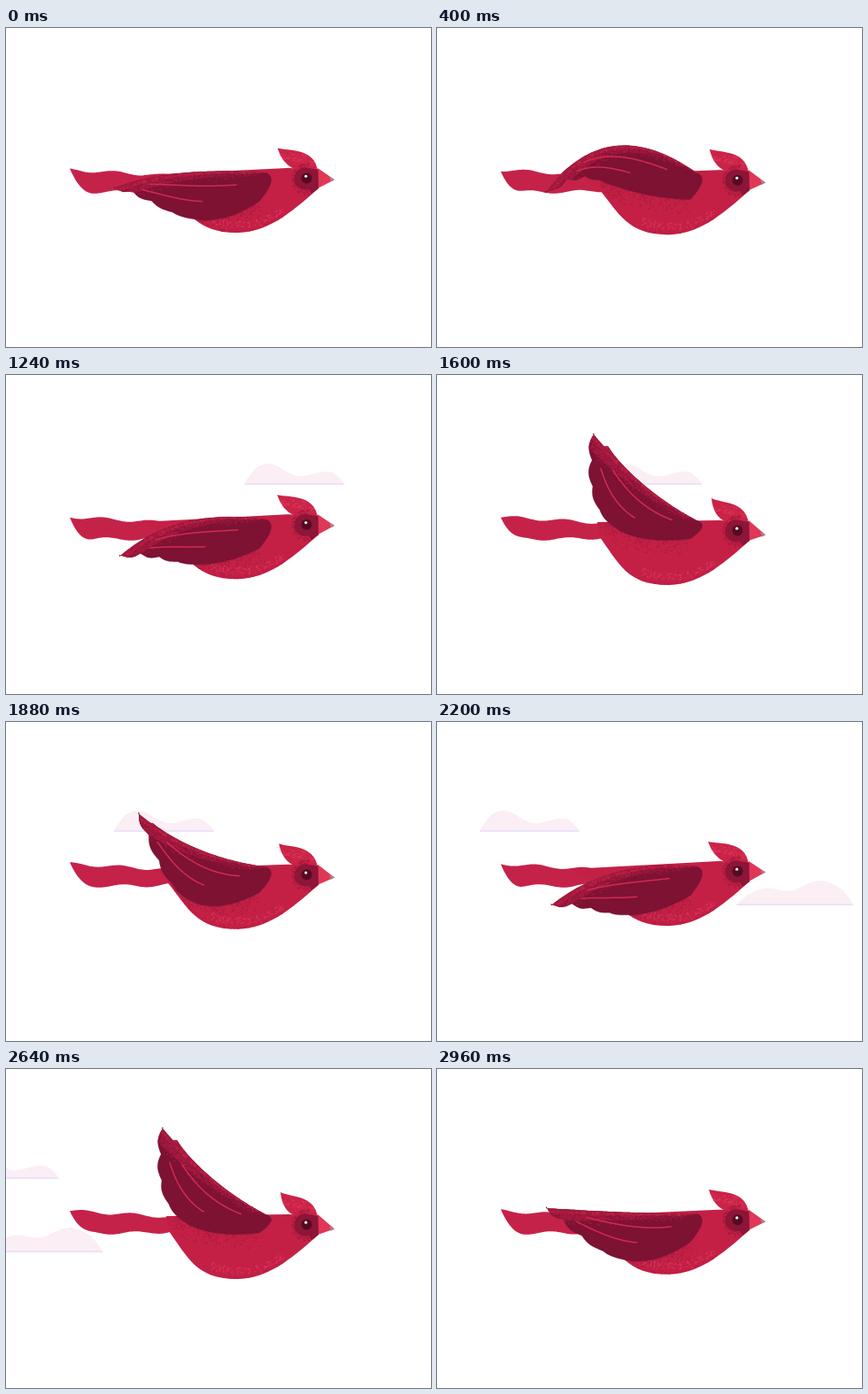
Write an HTML page with a canvas that moves like this. It is 480 px wide and 360 px high and loops after 3000 ms.

```html
<!DOCTYPE html>
<html lang="en">
<head>
<meta charset="utf-8">
<title>Flying bird</title>
<style>
html, body { margin: 0; width: 100%; height: 100%; overflow: hidden; background: #fff; }
canvas { display: block; width: 480px; height: 360px; }
</style>
</head>
<body>
<canvas id="stage"></canvas>
<script>
const canvas = document.getElementById('stage');
const ctx = canvas.getContext('2d');
const dpr = window.devicePixelRatio || 1;
canvas.width = 480 * dpr;
canvas.height = 360 * dpr;

const LOOP = 3000, FLAP = 1000, STEP = 40, DIP = 7;
const RED = '#c42045', DARK = '#7d1233', PINK = '#d22a4f';

// Each wing pose: tip, pull on the leading edge, two pulls on the trailing edge
const rest = [[122, 181], [183, 156], [163, 178], [202, 252]];
const down = [[129, 207], [193, 155], [180, 198], [202, 243]];
const fold = [[123, 186], [192, 92], [182, 144], [175, 189]];
const up = [[176, 66], [230, 131], [170, 125], [165, 198]];
const mid = [[149, 103], [209, 152], [172, 145], [184, 246]];
const flat = [[123, 157], [208, 163], [160, 177], [202, 254]];

// at: time in the flap, dip: how far the body has sunk, ease: power to the next key
const keys = [
  { at: 0, wing: rest, dip: .15, ease: .7 },
  { at: 200, wing: down, dip: 0, ease: 1.4 },
  { at: 400, wing: fold, dip: .45, ease: 1 },
  { at: 600, wing: up, dip: 1, ease: 1 },
  { at: 700, wing: up, dip: 1, ease: 1.9 },
  { at: 880, wing: mid, dip: .55, ease: 1 },
  { at: 960, wing: flat, dip: .25, ease: 1 },
  { at: FLAP, wing: rest, dip: .15 }
];

// Humps are [centre, height, spread]
const clouds = [
  { width: 113, bottom: 124, base: 4, humps: [[27, 20, 26], [92, 11, 25]],
    x: t => 352 - (t - 880) * .2303 },
  { width: 132, bottom: 207, base: 6, humps: [[34, 13, 24], [95, 22, 32]],
    x: t => 338 - (t - 2200) * .8205 }
];

const mix = (a, b, k) => a + (b - a) * k;
const mixPt = (p, q, k) => [mix(p[0], q[0], k), mix(p[1], q[1], k)];
const clamp = v => Math.max(0, Math.min(1, v));

function bezier(pts, t) {
  while (pts.length > 1) pts = pts.slice(1).map((p, i) => mixPt(pts[i], p, t));
  return pts[0];
}

function sample(fn, from = 0, to = 1, n = 60) {
  return Array.from({ length: n + 1 }, (_, i) => fn(mix(from, to, i / n)));
}

function random(seed) {
  return () => (seed = (seed * 16807) % 2147483647) / 2147483647;
}

// Point at share t of a curve, moved to its right-hand side by off
function beside(fn, t, off) {
  const [x, y] = fn(t), a = fn(t - .01), b = fn(t + .01);
  const dx = b[0] - a[0], dy = b[1] - a[1], len = Math.hypot(dx, dy) || 1;
  return [x - dy / len * off, y + dx / len * off];
}

function polygon(pts) {
  const path = new Path2D();
  pts.forEach(p => path.lineTo(...p));
  path.closePath();
  return path;
}

function fill(path, color) {
  ctx.fillStyle = color;
  ctx.fill(path);
}

function edge(path) {
  ctx.strokeStyle = 'rgba(90,20,50,.4)';
  ctx.lineWidth = .5;
  ctx.stroke(path);
}

function disc(x, y, r, color) {
  const path = new Path2D();
  path.arc(x, y, r, 0, Math.PI * 2);
  fill(path, color);
}

function clipped(path, draw) {
  ctx.save();
  ctx.clip(path);
  draw();
  ctx.restore();
}

function speckle(fn, count, color, seed, offset) {
  const rnd = random(seed);
  ctx.fillStyle = color;
  for (let i = 0; i < count; i++) {
    const t = rnd(), [x, y] = beside(fn, t, offset(rnd(), t));
    const r = .7 + rnd() * .7;
    ctx.fillRect(x, y, r * 1.3, r);
  }
}

function pose(tau) {
  const i = keys.findIndex((k, n) => tau < keys[n + 1].at);
  const a = keys[i], b = keys[i + 1];
  const k = Math.pow((tau - a.at) / (b.at - a.at), a.ease);
  return { pull: a.wing.map((p, n) => mixPt(p, b.wing[n], k)), dip: mix(a.dip, b.dip, k) };
}

function makeWing({ pull, dip }) {
  const [tip, front, back1, back2] = pull;
  const shoulder = [293, 163 + dip], root = [286, 196 - 11 * dip * dip];
  const lead = t => bezier([tip, front, shoulder], t);
  const trail = t => bezier([tip, back1, back2, root], t);
  // Feather ends swell along the trailing edge, one more opens near the tip
  const swell = t => (4.5 * Math.abs(Math.sin(6 * Math.PI * t)) - 1.5) * clamp(1.3 - 2 * t);
  const split = t => t < .12 ? 0 : -4 * dip * dip * Math.exp((.12 - t) * 9);
  const leadEdge = t => beside(lead, t, split(t));
  const shape = polygon([
    ...sample(leadEdge),
    ...sample(t => bezier([shoulder, [309, shoulder[1] + 5], root], t)),
    ...sample(t => beside(trail, t, swell(t)), 1, 0)
  ]);
  return { lead, leadEdge, trail, shape };
}

function drawCloud({ width, bottom, base, humps, x }, t, alpha) {
  const height = s => Math.sqrt(clamp(Math.min(s, width - s) / 12)) *
    humps.reduce((sum, [c, h, w]) => sum + h * Math.exp(-(((s - c) / w) ** 2)), base);
  const path = polygon(sample(s => [s, bottom - height(s)], 0, width));
  ctx.save();
  ctx.globalAlpha = alpha;
  ctx.translate(x(t), 0);
  fill(path, '#fceef5');
  clipped(path, () => {
    ctx.fillStyle = '#ebe2fa';
    ctx.fillRect(0, bottom - 1.8, width, 2);
  });
  ctx.restore();
}

function drawTail(tau) {
  const wave = x => 1.8 * Math.cos(2 * Math.PI * ((x - 95) / 55 + tau / FLAP));
  const top = x => 160 + (x - 72) * .06 + wave(x);
  const low = x => {
    const open = 1 - Math.pow(Math.max(0, 100 - x) / 28, 2.5);
    return mix(top(x), 185 + wave(x - 4) - Math.max(0, x - 150) * .04, open);
  };
  const path = polygon([
    ...sample(x => [x, top(x)], 72, 186),
    ...sample(x => [x, low(x)], 186, 72)
  ]);
  fill(path, '#c5224a');
}

function drawBody(dip, wing) {
  const y = DIP * dip;
  const path = new Path2D();
  path.moveTo(184, 183);
  path.lineTo(mix(150, 181, dip), 166);
  path.lineTo(318, 157 + y);
  path.lineTo(353, 158 + y);
  path.lineTo(353, 180 + y);
  path.bezierCurveTo(320, 209 + y, 295, 230 + y, 260, 230 + y);
  path.bezierCurveTo(215, 230 + y, 205, 205 + y, 184, 183);
  fill(path, RED);
  clipped(path, () => {
    speckle(t => wing.trail(.5 + t / 2), 300, '#ab1b40', 31, r => r * r * 16);
    const belly = t => bezier([[232, 212 + y], [272, 230 + y], [312, 202 + y]], t);
    speckle(belly, 130, '#d9335f', 47, r => (r - .3) * 9);
    speckle(belly, 60, '#b51a40', 59, r => 4 + r * 8);
  });
}

function drawHead(dip) {
  ctx.save();
  ctx.translate(0, DIP * dip);

  const tip = [371, 169.5 + 4 * dip];
  fill(polygon([[352, 157], tip, [352, 180]]), '#e03757');
  fill(polygon([tip, [tip[0] - 6, tip[1] - 3.8], [tip[0] - 4, tip[1] + 2.2]]), '#a8808f');

  const crest = new Path2D();
  crest.moveTo(mix(306, 310, dip), mix(135, 132, dip));
  crest.bezierCurveTo(320, 138, 348, 134, 352, 160);
  crest.lineTo(325, 158);
  crest.quadraticCurveTo(312, 152, mix(306, 310, dip), mix(135, 132, dip));
  fill(crest, '#cb2348');
  clipped(crest, () => speckle(t => [mix(310, 350, t), 138 + 9 * t * t], 60, '#dc3c5d', 71, r => r * 9));

  speckle(t => [339 + 12 * Math.cos(Math.PI * (.45 + t * 1.1)), 169 + 12 * Math.sin(Math.PI * (.45 + t * 1.1))],
    110, '#a3193d', 83, r => -r * 6);
  const mask = new Path2D();
  mask.arc(338, 169, 12.5, Math.PI * .4, Math.PI * 1.6);
  mask.lineTo(352.5, 159);
  mask.lineTo(353, 180);
  mask.lineTo(345, 186);
  mask.closePath();
  fill(mask, '#8c1538');
  disc(339.5, 168.5, 6, '#560a22');
  disc(338.7, 166.2, 1.6, '#fff');
  ctx.restore();
}

function drawWing({ lead, leadEdge, trail, shape }) {
  const band = t => 14 * Math.pow(clamp(1 - t), .6);
  fill(shape, DARK);
  clipped(shape, () => {
    const strip = polygon([
      ...sample(t => beside(leadEdge, t, -4)),
      ...sample(t => beside(lead, t, band(t)), 1, 0)
    ]);
    fill(strip, '#a4193e');
    speckle(lead, 200, '#c9244a', 7, (r, t) => (r * .6 - .25) * band(t));
    speckle(lead, 330, '#86143a', 13, (r, t) => band(t) * (.35 + r * .75));
    speckle(lead, 70, '#a0193d', 19, (r, t) => band(t) * (1 + r * .4));
  });

  const vein = (depth, from, to) => {
    const path = new Path2D();
    sample(t => mixPt(lead(t), trail(t), depth), from, to).forEach(p => path.lineTo(...p));
    ctx.stroke(path);
  };
  ctx.strokeStyle = PINK;
  ctx.lineCap = 'round';
  ctx.lineWidth = 1.5;
  vein(.3, .3, .86);
  vein(.62, .25, .68);
  edge(shape);
}

function draw(t) {
  ctx.setTransform(dpr, 0, 0, dpr, 0, 0);
  ctx.fillStyle = '#fff';
  ctx.fillRect(0, 0, 480, 360);

  const fade = Math.min(clamp((t - 560) / 160), clamp((2800 - t) / 120));
  clouds.forEach(c => drawCloud(c, t, fade));

  const tau = t % FLAP, now = pose(tau), wing = makeWing(now);
  drawTail(tau);
  drawBody(now.dip, wing);
  drawHead(now.dip);
  drawWing(wing);
}

const start = performance.now();
function tick() {
  const t = (performance.now() - start) % LOOP;
  draw(Math.floor(t / STEP) * STEP);
  requestAnimationFrame(tick);
}
tick();
</script>
</body>
</html>
```
